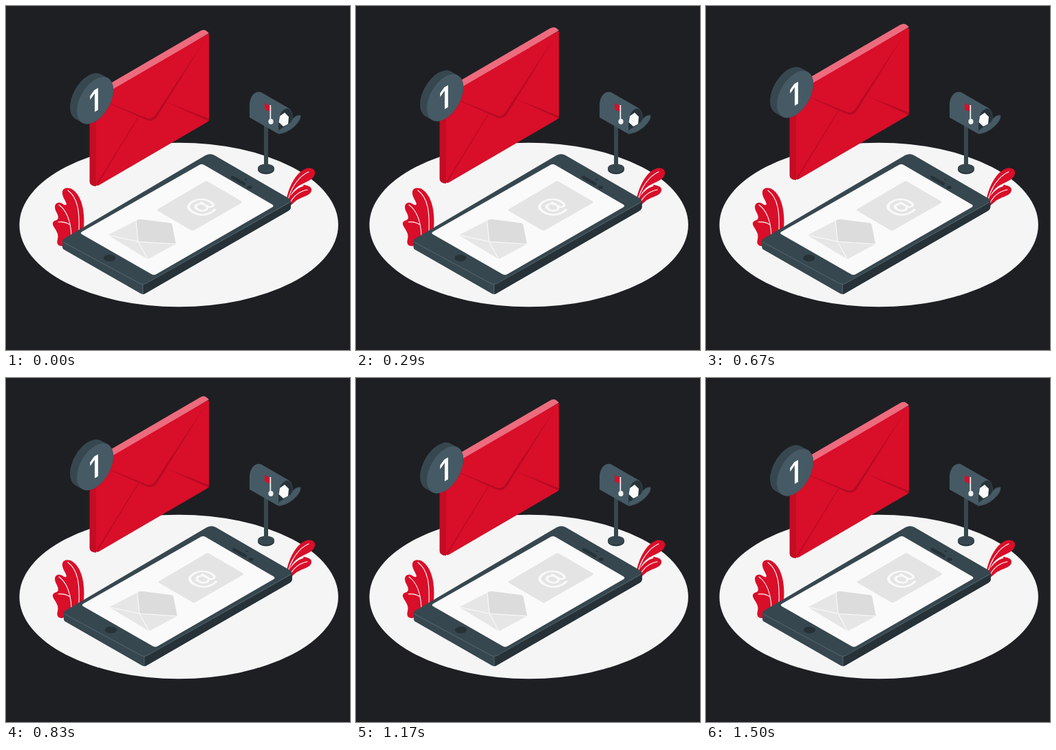
Write an HTML page that moves like this. It is 500 px wide and 500 px high and loops after 1540 ms.

```html
<!DOCTYPE html>
<html lang="en">
<head>
<meta charset="utf-8">
<title>New mail</title>
<style>
  html, body { margin: 0; height: 100%; overflow: hidden; background: #1e1f23; }
  svg { display: block; width: 100%; height: 100%; }
  text { font-family: Inter, Arial, sans-serif; text-anchor: middle; }
  .red { fill: #d90e29; }
  .deep { fill: #b30b22; }
  .slate { fill: #455a64; }
  .dark { fill: #37474f; }
  .night { fill: #263238; }
  .vein { fill: none; stroke: #fff; stroke-width: 1.1; stroke-linecap: round; }
</style>
</head>
<body>
<svg viewBox="0 0 500 500">
  <ellipse cx="251.2" cy="318" rx="231.7" ry="119.2" fill="#f5f5f5"/>

  <g id="plants">
    <path class="red" d="M82 349C76 349 73 346 75 339C77 331 73 327 69 320C66 314 70 312 74 311C78 308 75 303 72 297C69 288 74 285 79 286C84 288 86 291 88 288C87 283 81 277 82 270C83 264 91 263 97 267C110 276 115 298 113 322L104 340Z"/>
    <path class="vein" d="M90 268C105 279 107 300 106 328M77 289C89 298 94 313 95 333M76 314Q86 313 93 318"/>
    <path class="red" d="M407 286C409 266 421 241 437 236C446 234 450 239 449 244C447 252 438 255 430 259C438 261 444 262 444 267C444 275 434 276 427 280C421 282 418 287 412 291Z"/>
    <path class="vein" d="M410 282C414 264 426 247 440 241M413 286C419 274 428 269 438 267"/>
    <path d="M413 277C417 267 424 261 433 258L432 262C424 264 418 270 413 277Z" fill="#f5f5f5"/>
  </g>

  <g id="mailbox">
    <ellipse class="night" cx="378" cy="237.5" rx="12" ry="7"/>
    <ellipse class="dark" cx="378" cy="236" rx="12" ry="6.6"/>
    <path class="dark" d="M375 170H381V235Q378 237.5 375 235Z"/>
    <path class="slate" d="M354 162V144C354 133 361 122 371 125.500L410 148C415 151 417 157 416.500 164L416 175L396 186Z"/>
    <path class="night" d="M396 186V171C396 159 402 149 409 149C414 150 416 156 416 163V174Z"/>
    <path d="M398 160L405 155L411 161L410 172L403 175L396.500 169Z" fill="#fafafa"/>
    <path class="slate" d="M396 186V181L414 169C417 162 423 158 428 159C429 164 424 171 418 176C411 182 404 185 396 186Z" stroke="#37474f" stroke-width=".8"/>
    <path class="red" d="M376 141L384 145V154L376 150Z"/>
    <path d="M384.300 144V166" stroke="#f0f0f0" stroke-width="1.800"/>
    <ellipse cx="385" cy="168" rx="3.600" ry="4" fill="#f0f0f0"/>
  </g>

  <g id="phone">
    <path class="dark" d="M82 341V350Q82 353 85 354.500L195 417.500Q199 420 203 417.500L410 298Q414 295.500 414 292V284Z"/>
    <path class="night" d="M199 404V418.800Q201 418.800 203 417.500L410 298Q414 295.500 414 292V284Z"/>
    <path d="M84.500 338L290 217Q297 213.500 303 217L411 279.500Q416 283 411 286.500L203 403Q199 405.500 195 403L85 344Q80 341 84.500 338Z" fill="#37474f"/>
    <path d="M83 343L195 403.500Q199 405.500 203 403.500L413 285M199 405V418" fill="none" stroke="#5d727c" stroke-width=".8"/>
    <path d="M110.500 328L281 231Q284.500 229 288 231L387 288.500Q390 290.500 387 292.500L219 389.500Q215 392 211 389.500L110.500 332Q107 330 110.500 328Z" fill="#fafafa"/>
    <ellipse class="night" cx="150.500" cy="366.300" rx="8.600" ry="4.900"/>
    <path d="M329 249L346 258.700" stroke="#263238" stroke-width="4.400" stroke-linecap="round"/>
    <ellipse class="night" cx="354" cy="263.500" rx="3.700" ry="2.300"/>
    <ellipse class="night" cx="348.300" cy="252" rx="1.700" ry="1.100"/>
    <path d="M221 295L289 255Q291 254 293 255L342 283.500Q344 285 342 286.500L273 326Q271 327 269 326L221 298Q218 296.500 221 295Z" fill="#e4e4e4"/>
    <text transform="matrix(.866 -.5 .866 .5 282 291)" y="12.500" font-size="38" font-weight="500" fill="#fafafa">@</text>
    <path d="M148 333L189 312L247 346L206 368Z" fill="#e6e6e6"/>
    <path d="M189 312Q191 310 196 310L239 315.500Q241 316 241.500 318L247 346L192 342.500Z" fill="#dcdcdc"/>
    <path d="M148 333L192 342.500L206 368M189 312L192 342.500L247 346" fill="none" stroke="#fafafa" stroke-width="1.100"/>
  </g>

  <g id="letter">
    <path d="M121.500 130L282 36.500Q287 33.500 291 36L295 39.500L131 138Z" fill="#ec6c7e"/>
    <path d="M121.500 130L131 135V262Q121.500 261.500 121.500 255Z" fill="#c40c25"/>
    <path class="red" d="M131 135L292 41.500Q295 40 295 42V163Q295 167 292 169L135 260.500Q131 262.500 131 258Z"/>
    <path class="deep" d="M131 133L203 162.500Q211 166 216.500 159.500L289 49L220 160Q214 169 205 166Z"/>
    <path class="deep" d="M131 260.500L192.500 161L132.500 260Z" stroke="#b30b22" stroke-width=".7"/>
    <path class="deep" d="M232 139L295 164V167.500Z"/>
    <g transform="matrix(.866 -.5 0 1 129.500 137.300)">
      <path d="M0 0L-11.500 -11.300" stroke="#37474f" stroke-width="61.200" stroke-linecap="round"/>
      <circle class="slate" r="30.600"/>
      <text x="-1" y="16.300" font-size="44" font-weight="600" fill="#fff">1</text>
    </g>
  </g>
</svg>
<script>
  const LOOP = 1540, FPS = 24, CYCLE = 36;
  const phone = document.getElementById("phone");
  const letter = document.getElementById("letter");
  // Sideways shake in tenths of a cycle.
  const shake = [0, -1, 2, -4, 4, -4, 4, -4, 2, -1, 0];

  const shakeAt = p => {
    const i = Math.floor(p * 10), k = p * 10 - i;
    return shake[i] + (shake[i + 1] - shake[i]) * k;
  };
  const floatAt = p => -10 * (1 - Math.abs(1 - 2 * p));

  function draw(now) {
    const step = Math.floor((now % LOOP + 4) * FPS / 1000);
    const p = (step + 0.6) / CYCLE % 1;
    phone.setAttribute("transform", `translate(${shakeAt(p) + 0.17} 0)`);
    letter.setAttribute("transform", `translate(0 ${floatAt(p) + 0.3})`);
  }

  const start = performance.now();
  function tick() {
    draw(performance.now() - start);
    requestAnimationFrame(tick);
  }
  tick();
</script>
</body>
</html>
```
